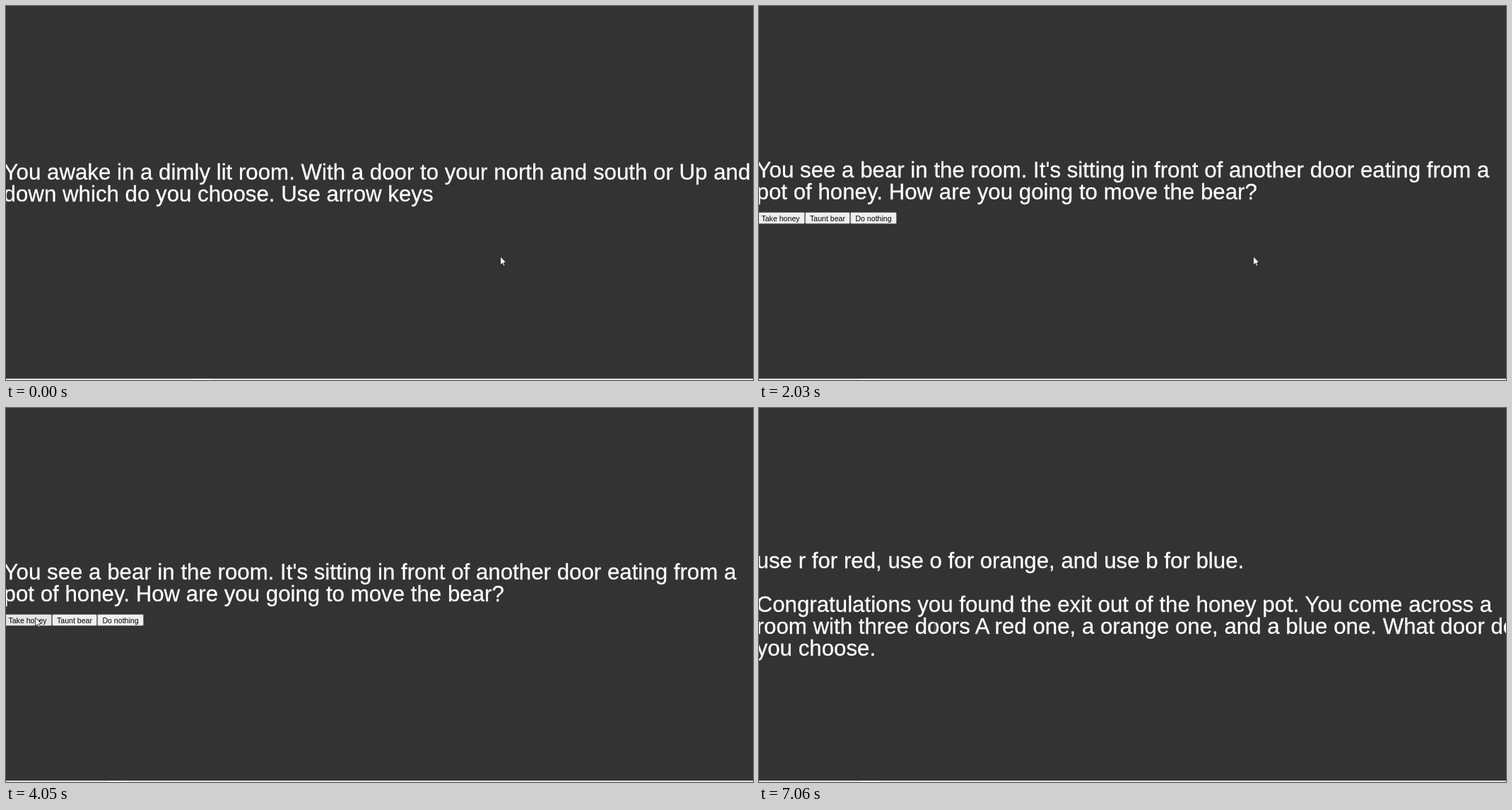
An HTML page with a canvas that plays this animation: 1057x530 px, repeating every 8 s.

```html
<!DOCTYPE html>
<html lang="en">
<head>
<meta charset="utf-8">
<title>Text adventure</title>
<style>
  html, body { margin: 0; width: 100%; height: 100%; overflow: hidden; background: #333; }
  canvas { display: block; }
</style>
</head>
<body>
<canvas id="stage" width="1057" height="530"></canvas>
<script>
const ctx = document.getElementById('stage').getContext('2d');
const LOOP = 8000;
const FAMILY = '"Liberation Sans", Arial, sans-serif';

// Each passage is a list of [baseline, text].
const wake = [
  [246, 'You awake in a dimly lit room. With a door to your north and south or Up and'],
  [277, 'down which do you choose. Use arrow keys']
];
const bear = [
  [243, "You see a bear in the room. It's sitting in front of another door eating from a"],
  [274, 'pot of honey. How are you going to move the bear?']
];
const honeyPot = [
  [211, 'Bad call. The angry bear slaps you into the honey pot. You got transported'],
  [242, 'into the bears honeypot. Everything is made of honey. What will you do?'],
  [305, 'Use e for eat and d for dig']
];
const threeDoors = [
  [227, 'use r for red, use o for orange, and use b for blue.'],
  [289, 'Congratulations you found the exit out of the honey pot. You come across a'],
  [320, 'room with three doors A red one, a orange one, and a blue one. What door do'],
  [351, 'you choose.']
];

const buttons = [
  { label: 'Take honey', left: -4, right: 65 },
  { label: 'Taunt bear', left: 65, right: 129 },
  { label: 'Do nothing', left: 129, right: 195 }
];

const scenes = [
  { start: 0, lines: wake, arrow: [699, 354] },
  { start: 2030, lines: bear, arrow: [699, 354], choices: true },
  { start: 3030, lines: bear, arrow: [117, 300], choices: true, hover: 1 },
  { start: 4050, lines: bear, arrow: [41, 296], choices: true, hover: 0 },
  { start: 5030, lines: honeyPot, arrow: [220, 314] },
  { start: 7060, lines: threeDoors, caret: [249, 310] }
];

// Kerns across spaces as well as inside words.
ctx.textRendering = 'optimizeLegibility';

function drawLines(lines) {
  ctx.font = `31.25px ${FAMILY}`;
  ctx.textAlign = 'left';
  ctx.fillStyle = ctx.strokeStyle = '#fff';
  ctx.lineWidth = 0.3;
  ctx.lineJoin = 'round';
  for (const [y, text] of lines) {
    ctx.fillText(text, -3.4, y);
    ctx.strokeText(text, -3.4, y);
  }
}

function drawButtons(hover) {
  ctx.font = `10.6px ${FAMILY}`;
  ctx.textAlign = 'center';
  ctx.lineWidth = 1;
  buttons.forEach(({ label, left, right }, i) => {
    ctx.beginPath();
    ctx.roundRect(left + 0.5, 292.5, right - left - 1, 16, 1.5);
    ctx.fillStyle = i === hover ? '#e5e5e5' : '#efefef';
    ctx.fill();
    ctx.strokeStyle = '#767676';
    ctx.stroke();
    ctx.fillStyle = '#000';
    ctx.fillText(label, (left + right) / 2, 305);
  });
}

const arrowShape = new Path2D('M.5 .8V13L3.4 10.4 5.2 14.6 7 13.8 5.3 9.8H9Z');

function drawArrow([x, y]) {
  ctx.save();
  ctx.translate(x, y);
  ctx.lineWidth = 0.8;
  ctx.strokeStyle = '#111';
  ctx.fillStyle = '#fff';
  ctx.fill(arrowShape);
  ctx.stroke(arrowShape);
  ctx.restore();
}

function drawCaret([x, y]) {
  ctx.fillStyle = '#777';
  ctx.fillRect(x - 0.5, y - 6, 1, 12);
  ctx.fillRect(x - 2, y - 7, 4, 1);
  ctx.fillRect(x - 2, y + 6, 4, 1);
}

function drawBottomStrip(time) {
  ctx.fillStyle = '#d2e6e8';
  ctx.fillRect(0, 528, 1057, 2);
  ctx.fillStyle = '#f0ede4';
  ctx.fillRect(time < 1000 ? 262 : 142, 528, 29, 2);
}

function render(now) {
  const time = now % LOOP;
  const scene = scenes.findLast(s => s.start <= time) || scenes[0];
  ctx.fillStyle = '#333';
  ctx.fillRect(0, 0, 1057, 530);
  drawBottomStrip(time);
  drawLines(scene.lines);
  if (scene.choices) drawButtons(scene.hover);
  if (scene.arrow) drawArrow(scene.arrow);
  if (scene.caret) drawCaret(scene.caret);
}

const origin = performance.now();
function tick() {
  render(performance.now() - origin);
  requestAnimationFrame(tick);
}
tick();
</script>
</body>
</html>
```
